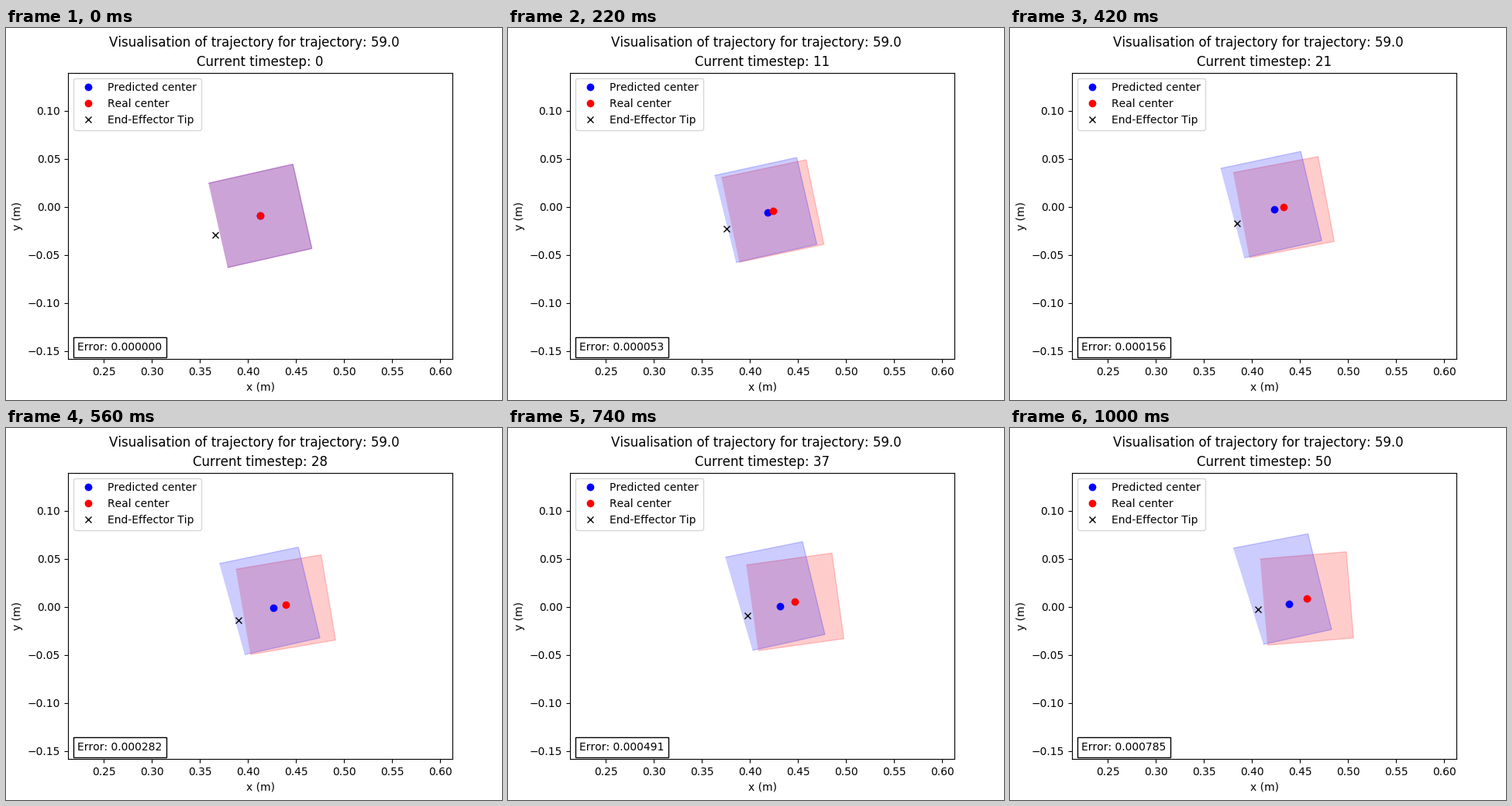
A matplotlib script for the animation above (1020 ms loop, 640 by 480 pixels).

```python
import numpy as np
import matplotlib.pyplot as plt
from matplotlib.animation import FuncAnimation
from matplotlib.patches import Polygon

plt.rcParams["text.kerning_factor"] = 6   # whole-pixel kerning

FRAMES, INTERVAL = 51, 20
X0, Y0 = 0.4129, -0.0092      # centre of the view, metres
SCALE = 1240                  # pixels per metre
CX, CY = 328, 242.4           # centre of the axes, pixels from top left
HALF = 0.045                  # half the side of the real square, metres


def ease(start, end, bow, u):
    """Go from start to end, bent off the straight line by bow."""
    start, end, bow = map(np.asarray, (start, end, bow))
    return start + (end - start) * u + bow * u * (1 - u)


def to_data(px):
    return (np.asarray(px) - (CX, CY)) * (1, -1) / SCALE + (X0, Y0)


def square(angle):
    c, s = np.cos(angle), np.sin(angle)
    corners = HALF * np.array([(-1, 1), (1, 1), (1, -1), (-1, -1)])
    return corners @ np.array([(c, s), (-s, c)])


def pose(i):
    """Centres, tip and both outlines at timestep i, in metres."""
    u = i / (FRAMES - 1)
    real = to_data(ease((CX, CY), (383, 220), (8.75, -7.75), u))
    pred = to_data(ease((CX, CY), (360, 227), (-3, -6), u))
    tip = to_data(ease((270, 267), (320, 234), (8, -3), u))
    real_box = real + square(np.radians(ease(12.7, 4.8, 5.7, u)))
    start = to_data((CX, CY)) + square(np.radians(12.7))
    end = to_data([(288, 155), (384.5, 136.5), (415, 260), (327, 279.2)])
    pred_box = ease(start, end, (-4 / SCALE, 0), u)
    return real, pred, tip, real_box, pred_box


def error(i):
    """Mean squared error, whose root grows almost evenly."""
    steps = [0, 11, 21, 28, 37, 42, 50]
    roots = np.sqrt([0, 53, 156, 282, 491, 625, 785])
    return np.interp(i, steps, roots) ** 2 * 1e-6


fig, ax = plt.subplots(figsize=(6.4, 4.8), dpi=100)
fig.suptitle("Visualisation of trajectory for trajectory: 59.0")
ax.set_xlim(X0 - 248 / SCALE, X0 + 248 / SCALE)
ax.set_ylim(Y0 - 184.8 / SCALE, Y0 + 184.8 / SCALE)
ax.set_xlabel("x (m)")
ax.set_ylabel("y (m)")
title = ax.set_title("")

real_patch, pred_patch = (
    ax.add_patch(Polygon(square(0), closed=False, color=color, alpha=0.2))
    for color in ("red", "blue"))
pred_dot, = ax.plot([], [], "o", color="blue", label="Predicted center")
real_dot, = ax.plot([], [], "o", color="red", label="Real center")
tip_mark, = ax.plot([], [], "x", color="black", label="End-Effector Tip")
ax.legend(loc="upper left")
label = ax.text(X0 - 0.19, Y0 - 0.14, "",
                bbox=dict(facecolor="white", edgecolor="black"))


def update(i):
    real, pred, tip, real_box, pred_box = pose(i)
    title.set_text(f"Current timestep: {i}")
    label.set_text(f"Error: {error(i):.6f}")
    real_patch.set_xy(real_box)
    pred_patch.set_xy(pred_box)
    for mark, (x, y) in ((pred_dot, pred), (real_dot, real), (tip_mark, tip)):
        mark.set_data([x], [y])
    return title, label, real_patch, pred_patch, pred_dot, real_dot, tip_mark


anim = FuncAnimation(fig, update, frames=FRAMES, interval=INTERVAL,
                     repeat=True, repeat_delay=0)
plt.show()
```
